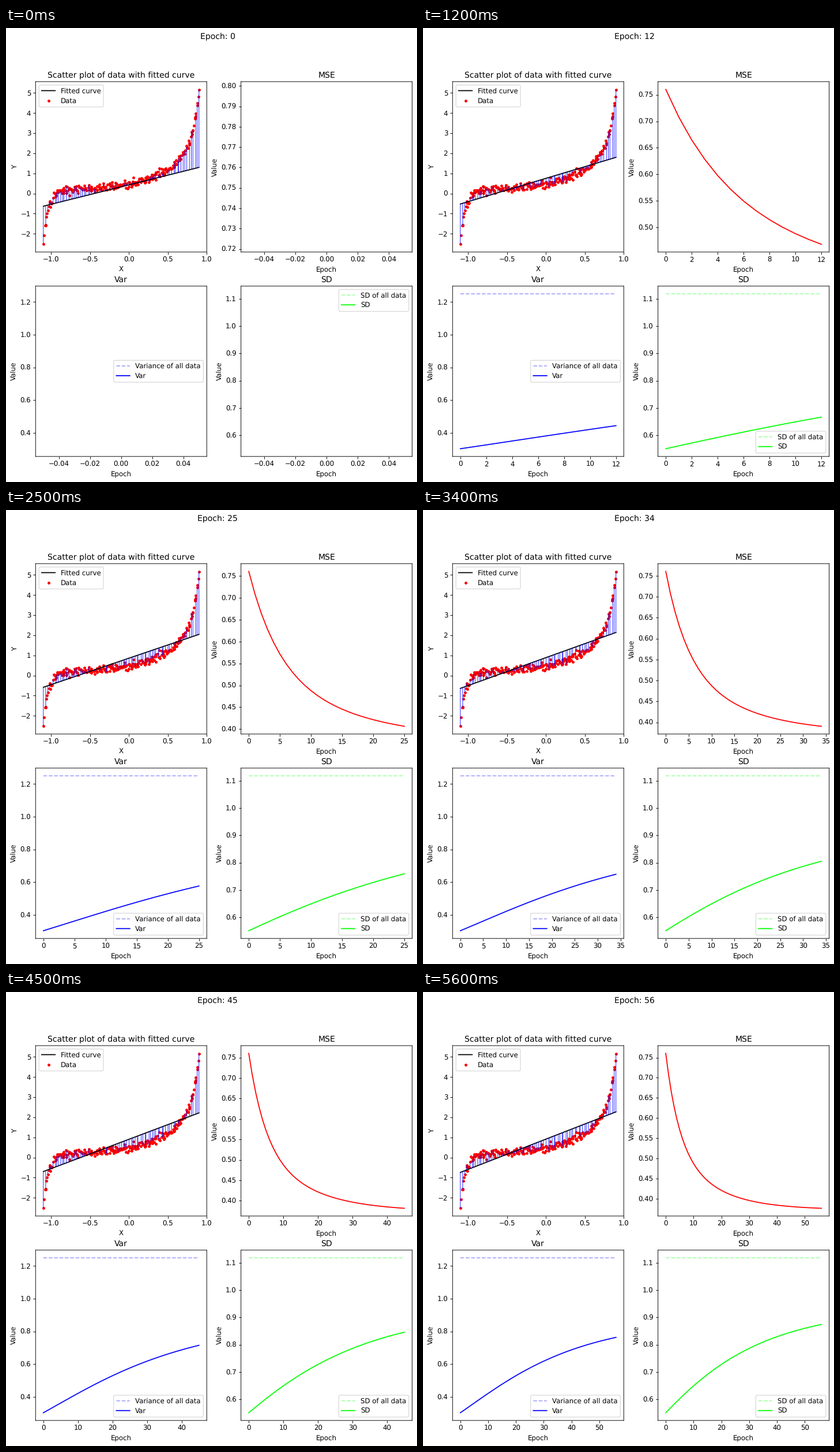
Recreate the animation shown at these times as a matplotlib script. Size 713 by 786 pixels, loop 5.7 s.

```python
import numpy as np
import matplotlib.pyplot as plt
from matplotlib.animation import FuncAnimation

W, H, DPI = 713, 786, 84.3
EPOCHS = 57
X_MIN, X_MAX = -1.1, .9

plt.rcParams.update({"text.hinting": "none", "path.snap": False,
                     "legend.labelspacing": .45})


def trend(x):
    """A gentle rise with a steep tail at either end."""
    rise = .12 + .36 * np.exp(2.2 * x)
    upper = 2.43 * np.exp((x - X_MAX) / .08)
    lower = 2.67 * np.exp((X_MIN - x) / .058)
    return rise + upper - lower


rng = np.random.default_rng(7)
x = np.linspace(X_MIN, X_MAX, 241)
x[1:-1] += rng.uniform(-.01, .01, x.size - 2)
x = np.clip(x, X_MIN, X_MAX)
noise = np.clip(rng.normal(0, .11, x.size), -.28, .28)
noise[[0, -1]] = 0
y = np.clip(trend(x) + noise, -2.52, 5.17)
stem_x, stem_y = x[::3], y[::3]

# Gradient descent of a straight line, from the moments of the data
X_MEAN, X_SD, Y_MEAN, Y_VAR = -.09, .583, .785, 1.2488
BEST_SLOPE, MSE_MIN, RATE = .9357 / X_SD, .3732, .1


def train(slope=.551 / X_SD, bias=-.489):
    """Slope and mean residual for each epoch, one step past the last."""
    steps = []
    for _ in range(EPOCHS + 1):
        steps.append((slope, bias))
        grad = X_MEAN * bias + X_SD ** 2 * (slope - BEST_SLOPE)
        slope -= RATE * grad
        bias -= RATE * (bias + X_MEAN * grad)
    return np.array(steps).T


slopes, biases = train()
mse = MSE_MIN + biases ** 2 + (X_SD * (slopes - BEST_SLOPE)) ** 2
sd = X_SD * slopes
var = sd ** 2


def fit(epoch, at):
    k = epoch + 1
    return Y_MEAN + biases[k] + slopes[k] * (at - X_MEAN)


fig, ((ax_fit, ax_mse), (ax_var, ax_sd)) = plt.subplots(
    2, 2, figsize=((W + .01) / DPI, (H + .01) / DPI), dpi=DPI)
fig.subplots_adjust(left=51.3 / W, right=704.6 / W,
                    top=1 - 92.9 / H, bottom=1 - 741.8 / H)
heading = fig.suptitle("", x=367.4 / W, y=1 - 8.5 / H)

ends = np.array([X_MIN, X_MAX])
fit_line, = ax_fit.plot(ends, fit(0, ends), color="black", label="Fitted curve")
ax_fit.scatter(x, y, s=10, color="red", label="Data")
stems = ax_fit.vlines(stem_x, stem_y, fit(0, stem_x), color="blue", lw=.7)
ax_fit.set(title="Scatter plot of data with fitted curve", xlabel="X",
           ylabel="Y", xlim=(-1.2, 1), ylim=(-2.905, 5.555))
ax_fit.legend(loc="upper left")

curves = []


def add_curve(ax, values, **style):
    line, = ax.plot([], [], **style)
    curves.append((line, values))


def constant(value):
    return np.full(EPOCHS, value)


add_curve(ax_mse, mse, color="red")
add_curve(ax_var, constant(Y_VAR), color="blue", ls="--", alpha=.35,
          label="Variance of all data")
add_curve(ax_var, var, color="blue", label="Var")
add_curve(ax_sd, constant(Y_VAR ** .5), color="lime", ls="--", alpha=.35,
          label="SD of all data")
add_curve(ax_sd, sd, color="lime", label="SD")

charts = {"MSE": ax_mse, "Var": ax_var, "SD": ax_sd}
for name, ax in charts.items():
    ax.set(title=name, xlabel="Epoch", ylabel="Value")
for ax in (ax_var, ax_sd):
    ax.legend(loc="best")


def update(epoch):
    heading.set_text(f"Epoch: {epoch}")
    fit_line.set_ydata(fit(epoch, ends))
    tops = fit(epoch, stem_x)
    stems.set_segments([[(px, py), (px, top)]
                        for px, py, top in zip(stem_x, stem_y, tops)])
    n = epoch + 1
    for line, values in curves:
        line.set_data(np.arange(n), values[:n])
    for ax in charts.values():
        ax.relim()
        ax.autoscale_view()


anim = FuncAnimation(fig, update, frames=EPOCHS, interval=100,
                     repeat=True, repeat_delay=0)
plt.show()
```
